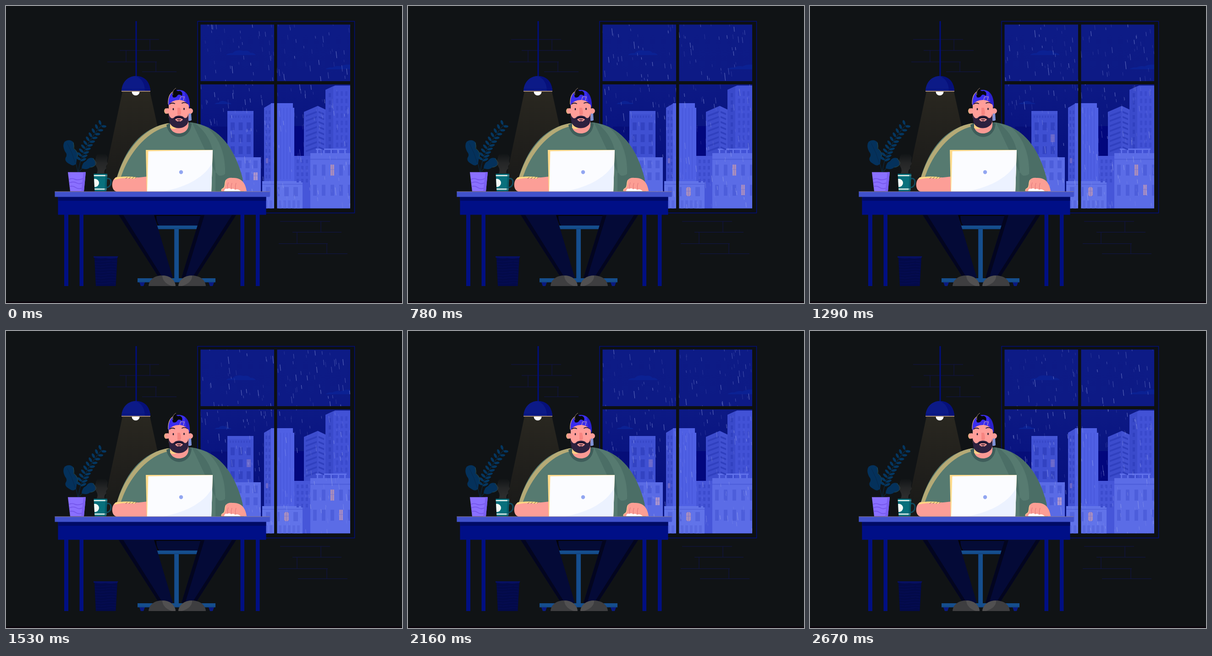
An HTML page that plays this animation: 864 by 648 pixels, repeating every 2700 ms.

```html
<!DOCTYPE html>
<html lang="en">
<head>
<meta charset="utf-8">
<title>Rainy night at the desk</title>
<style>
html, body { margin: 0; width: 100%; height: 100%; overflow: hidden; background: #101315; }
svg { display: block; width: 100vw; height: 100vh; }
</style>
</head>
<body>
<svg viewBox="0 0 864 648" xmlns="http://www.w3.org/2000/svg">
<defs>
  <clipPath id="panes"><path d="M424.5 40.5H585V164H424.5ZM591.5 40.5H751V164H591.5ZM424.5 171H585V441.5H424.5ZM591.5 171H751V441.5H591.5Z"/></clipPath>
  <clipPath id="shirtClip"><path id="shirt" d="M352 256C297 267 261 308 241 376V405H519L516 376C500 313 466 262 404 254Z"/></clipPath>
  <clipPath id="mugClip"><path d="M191.5 366H221L219 404H193.5Z"/></clipPath>
  <clipPath id="potClip"><path d="M135 362.500H174L170 404.500H140Z"/></clipPath>
  <linearGradient id="cone" x1="0" y1="0" x2="0" y2="1">
    <stop offset="0" stop-color="#292720"/><stop offset=".6" stop-color="#1f1e1b"/><stop offset="1" stop-color="#181918"/>
  </linearGradient>
  <linearGradient id="steam" x1="0" y1="0" x2="0" y2="1">
    <stop offset="0" stop-color="#333" stop-opacity="0"/><stop offset=".5" stop-color="#333" stop-opacity=".6"/><stop offset="1" stop-color="#333" stop-opacity=".85"/>
  </linearGradient>
  <linearGradient id="sky" x1="0" y1="0" x2="0" y2="1">
    <stop offset="0" stop-color="#0d1b86"/><stop offset=".3" stop-color="#0d1a85"/><stop offset=".7" stop-color="#07117e"/>
  </linearGradient>
</defs>

<rect width="864" height="648" fill="#101315"/>
<rect y="645" width="864" height="3" fill="#0b040c"/>
<g fill="none" stroke="#10154a">
  <path d="M225 73H334M314 73V97M248 97H357M262 97V122M221 122H329M327 122V143M297 143.500H372"/>
  <path d="M598 470H707M687 470V493M625 493.500H732M635 493V518M595 518.500H702M700 518V540M637 540.500H745"/>
</g>

<!-- window -->
<rect x="418" y="33.500" width="342.500" height="418" fill="#0d1012" stroke="#020e78" stroke-width="1.500"/>
<g clip-path="url(#panes)">
  <rect x="424" y="40" width="328" height="402" fill="url(#sky)"/>
  <g fill="#0b2193">
    <path d="M480 107q6-5 14-4q8-9 24-5q11-2 15 4q9 0 12 5Z"/>
    <path d="M697 138q7-5 15-4q10-5 18-2q8-5 22-4v10Z"/>
    <path d="M455 214q4-4 9-3q5-6 14-3q4 1 6 3q6 0 8 3Z"/>
  </g>
  <path d="M424 273H447V263H483V405H424Z" fill="#060e78"/>
  <rect x="629" y="262" width="22" height="70" fill="#02077d"/>
  <path d="M483 229H540V405H483Z" fill="#3f50d2"/>
  <path d="M483 229H540V236H483Z" fill="#4455d6"/>
  <path d="M500 330H556V405H500Z" fill="#5a6be5"/>
  <path d="M563 222L580 212V405H563Z" fill="#4252d3"/>
  <path d="M578 212H626V222H629V405H578Z" fill="#4f60e4"/>
  <path d="M650 231L680 218L697 226V335H650Z" fill="#3c4ccd"/>
  <path d="M680 218L697 226V335H680Z" fill="#4252d3"/>
  <path d="M697 183L718 173.500H751V330H697Z" fill="#4252d6"/>
  <path d="M697 183L714 175V330H697Z" fill="#3a4acb"/>
  <path d="M629 327H664V442H629Z" fill="#4656d9"/>
  <path d="M664 321H751V442H664Z" fill="#5b6ce6"/>
  <path d="M676 311H743V314H676ZM678 314H681V321H678ZM692 314H695V321H692ZM708 314H711V321H708ZM724 314H727V321H724ZM738 314H741V321H738Z" fill="#5f70ea"/>
  <path d="M664 333H751V336H664Z" fill="#5061dd"/>
  <path d="M559 382H647V442H559Z" fill="#6173e9"/>
  <path d="M559 388H647V390H559Z" fill="#5465df"/>
  <g id="dark"></g>
  <g id="lit"></g>
  <g id="rain" fill="none" stroke="#a5b0ee" stroke-linecap="round"></g>
</g>

<!-- lamp -->
<path d="M254 187H314L362 405H208Z" fill="url(#cone)"/>
<path d="M284 33V155" stroke="#010e7a" stroke-width="3"/>
<path d="M252 185C254 142 313 142 315 185Z" fill="#0c1a87"/>
<path d="M284 153C306 153 314 169 315 185H303C303 172 298 159 284 153Z" fill="#06107a"/>
<path d="M253 181H315" stroke="#071278"/>
<path d="M252 186H315" stroke="#cda98d" stroke-width="1.400"/>
<path d="M274.500 186.700H291.500C291 198 275 198 274.500 186.700Z" fill="#fff"/>

<!-- chair, trousers and shoes -->
<path d="M322 456H430L420 480H332Z" fill="#03030b"/>
<path d="M328 458H428V479H334Q328 471 328 458Z" fill="#040b36"/>
<g fill="#154e8d">
  <path d="M326 479H420V487H326ZM367 487H377V600H367ZM287 594H457V603H287Z"/>
</g>
<path d="M326 486H420M368 487V594M287 602H457" stroke="#103d79"/>
<g fill="#0a1a80"><path d="M291 603H303L300 611H294ZM442 603H454L451 611H445Z"/></g>
<path d="M246 456H323L364 593H334Z" fill="#040a37"/>
<path d="M246 456H256L342 593H334Z" fill="#03051f"/>
<path d="M425 456H502L414 593H383Z" fill="#040a37"/>
<path d="M425 456H433L391 593H383ZM493 456H502L414 593H406Z" fill="#03051f"/>
<g fill="#3e3e40">
  <path d="M311 611C312 596 325 588 341 588C358 588 369 598 370 611Z"/>
  <path d="M376 611C377 598 389 588 406 588C422 588 435 597 436 611Z"/>
</g>
<g fill="#515051">
  <path d="M341 588C358 588 369 598 370 611H362C352 608 341 600 341 588Z"/>
  <path d="M406 588C389 588 377 598 376 611H383C395 608 407 600 406 588Z"/>
</g>

<!-- bin -->
<path d="M193 549H243L239.500 611H196Z" fill="#030a49"/>
<path d="M191 546H244.500Q244 551 239 550Q227 552 217 550Q205 552 191 549Z" fill="#071060"/>
<g id="binLines" fill="none" stroke="#060d58"></g>

<!-- man -->
<use href="#shirt" fill="#567a70"/>
<g clip-path="url(#shirtClip)">
  <path d="M404 250C441 274 456 307 457 363Q472 374 478 366C480 320 462 282 435 262L525 250V405H457V363Z" fill="#4b6e66"/>
  <path d="M457 320C457 345 456 366 465 370Q474 371 478 365C477 343 473 317 463 300Z" fill="#577b71"/>
  <path d="M235 405C247 331 292 267 356 254L352 263C309 274 268 318 249 378V405Z" fill="#b5aa76"/>
</g>
<path d="M350 259C356 295 402 295 405 256L398 254L358 256Z" fill="#3e5d5a"/>
<path d="M358 243H398V259C398 284 358 284 358 261Z" fill="#fa9a94"/>
<path d="M358 253Q365 261 372 266Q366 271 358 266Z" fill="#ffcf84"/>
<path d="M397 234H404L405 249Q402 252 397 250Z" fill="#7e92d6"/>
<circle cx="352" cy="229" r="6" fill="#fb9d93"/>
<path d="M349 223.500C344 226 345 234 350 235" fill="none" stroke="#ffcf84" stroke-width="1.200"/>
<circle cx="402" cy="229" r="6" fill="#fb9d98"/>
<path d="M355 210Q377 196 399 211V240Q397 264 377 264Q356 262 355 238Z" fill="#ff9e99"/>
<path d="M355 236C359 247 364 246 367 243C371 238 384 238 388 243C391 246 396 245 398 235V250C396 271 359 273 356 250Z" fill="#2d213f"/>
<path d="M369 247Q377 242 386 247Q384 252 377 252Q371 252 369 247Z" fill="#fb9995"/>
<path d="M366 248Q369 240 377 242Q385 240 389 248Q383 244 377 245Q371 244 366 248Z" fill="#1c142c"/>
<path d="M373 248.500Q377 247 382 248.500M377.500 249V253" fill="none" stroke="#1c142c" stroke-width="1.300"/>
<path d="M374 222H380Q383 234 381 237Q377 240 374 237Z" fill="#f78581"/>
<path d="M357 214Q362 210 368 213M384 212Q391 209 396 213" fill="none" stroke="#21172d" stroke-width="1.800" stroke-linecap="round"/>
<ellipse cx="365" cy="225" rx="1.400" ry="2.500" fill="#21172d"/>
<ellipse cx="388.500" cy="224.500" rx="1.400" ry="2.500" fill="#21172d"/>
<path d="M354 217C352 195 363 183 377 183C393 183 401 197 401 223L398 215Q388 204 377 205Q362 205 354 217Z" fill="#3a2dee"/>
<path d="M390 187C399 194 402 207 401 223L398 215L393 209Z" fill="#2b20cd"/>
<path d="M354 214C353 198 359 188 368 185" fill="none" stroke="#e4b88c" stroke-width="1.100"/>
<path d="M379 205L381 198H389L387 206" fill="none" stroke="#c6a0b4" stroke-width="1.100"/>
<path d="M364 199C361 189 364 182 372 178C369 184 374 187 379 185Q387 188 384 196Q376 190 373 197Q369 201 364 199Z" fill="#07070d"/>
<path d="M364 194Q362 184 371 179" fill="none" stroke="#c5a98c" stroke-width=".8"/>

<!-- forearm, laptop, hand -->
<path d="M243 373Q275 377 309 372V405H243C227 404 229 375 243 373Z" fill="#fc9e97"/>
<path d="M239 374Q264 370 287 374L278 377Q258 373 236 379Z" fill="#ffd783"/>
<path d="M261 377l4-4M268 377l4-4M275 377l4-4M282 376l3-3" stroke="#593c49" stroke-width=".9"/>
<path d="M305 314H451L448 405H307Z" fill="#ffdb8b"/>
<path d="M310.500 317L451 314.500L448 405H308Z" fill="#fbfcff"/>
<path d="M450 342C435 371 399 394 342 405H448Z" fill="#ecf2ff"/>
<circle cx="382" cy="362.500" r="4.200" fill="#92a6f1"/>
<g id="hand">
  <path d="M470 404Q468 400 474 397C478 394 476 386 479 380Q484 374 494 375C511 374 522 383 525 404Z" fill="#fc9e94"/>
  <path d="M470 403Q470 399 475 397C479 393 477 386 480 380" fill="none" stroke="#ffcf8d" stroke-width="1.200"/>
  <path d="M476 404Q477 397 483 399Q488 396 491 400Q496 397 500 401Q506 398 512 404Z" fill="#fff"/>
  <path d="M485 385Q482 391 484 398M493 386Q490 393 492 399M502 386Q499 393 501 400" fill="none" stroke="#df7478"/>
</g>

<!-- plant -->
<g fill="none" stroke="#0a2942" stroke-width="1.300">
  <path d="M157 362Q152 336 141 318M158 362Q162 315 209 259M160 361Q167 352 182 345"/>
</g>
<path d="M128 296Q138 289 147 297Q149 305 147 311Q158 318 156 328Q154 335 153 344Q147 351 139 345Q127 339 130 331Q135 324 129 318Q122 304 128 296Z" fill="#04315b"/>
<path d="M147 298Q149 306 148 311Q158 318 156 329" fill="none" stroke="#315f5b" stroke-width=".8"/>
<path d="M134 300Q145 320 151 342" fill="none" stroke="#08284a"/>
<path d="M165 354Q166 342 175 338Q180 329 190 332L197 342Q195 351 184 352Q176 359 165 354Z" fill="#04315b"/>
<path d="M190 332L197 342Q195 351 184 352" fill="none" stroke="#31574f" stroke-width=".8"/>
<g id="fern" fill="#043660"></g>
<g clip-path="url(#potClip)">
  <rect x="134" y="362" width="41" height="43" fill="#8a70ff"/>
  <path d="M134 381q8-7 16-3t25-5M134 388q12-7 20-2t20-5M134 396q10-6 18 0t22-3" fill="none" stroke="#7658ec" stroke-width="2"/>
  <path d="M169 362H175V405H164Z" fill="#7c60f2"/>
</g>

<!-- mug -->
<path d="M198 365Q202 358 197 350Q191 341 196 332Q196 321 207 322Q219 319 222 331Q219 339 222 344Q217 350 219 354Q213 359 215 365Z" fill="url(#steam)"/>
<path d="M219 377C232 372 233 395 219 396" fill="none" stroke="#11495d" stroke-width="3"/>
<g clip-path="url(#mugClip)">
  <rect x="191" y="365" width="31" height="40" fill="#08707c"/>
  <path d="M191 370H222M191 399.500H222" stroke="#eef6f0" stroke-width="2.500"/>
  <circle cx="194" cy="386" r="9" fill="#f4faf6"/>
  <path d="M217 365H222V405H215Z" fill="#075766" opacity=".7"/>
</g>

<!-- desk -->
<g fill="#010f82"><path d="M127 455H136V611H127ZM160.500 455H169V611H160.500ZM511.500 455H520V611H511.500ZM545 455H553.500V611H545Z"/></g>
<rect x="113.500" y="416" width="454" height="39.500" fill="#000f87"/>
<rect x="113.500" y="416" width="454" height="9" fill="#000a66"/>
<rect x="106.500" y="405" width="469" height="11.500" fill="#4152cc"/>
<path d="M106.500 405H575.500" stroke="#8b7c91" stroke-width="1.200"/>
</svg>

<script>
const LOOP = 2700, STEP = 30;
const $ = id => document.getElementById(id);

function add(parent, tag, attrs) {
  const el = document.createElementNS("http://www.w3.org/2000/svg", tag);
  for (const k in attrs) el.setAttribute(k, attrs[k]);
  return parent.appendChild(el);
}

function grid(x, y, cols, rows, dx, dy, w, h, fill) {
  let d = "";
  for (let r = 0; r < rows; r++)
    for (let c = 0; c < cols; c++) d += `M${x + c * dx} ${y + r * dy}h${w}v${h}h${-w}Z`;
  add($("dark"), "path", { d, fill });
}

grid(490, 254, 3, 3, 17.5, 26, 9, 17, "#3343c2");
grid(488, 239, 8, 1, 6, 0, 3, 5, "#3848c8");
grid(505, 337, 3, 2, 17.5, 26, 9, 17, "#4c5dda");
grid(566, 228, 2, 11, 7, 14, 4, 8, "#3949c9");
grid(598, 222, 4, 1, 7, 0, 2, 156, "#4959dd");
grid(704, 190, 1, 8, 0, 16, 5, 9, "#3141c0");
grid(720, 186, 3, 8, 10, 16, 5, 10, "#3a4acd");
grid(634, 335, 3, 4, 10, 14, 5, 8, "#3c4cce");
grid(670, 346, 5, 2, 19, 44, 8, 24, "#4d5edb");
grid(567, 395, 4, 1, 20, 0, 10, 20, "#5364dd");
grid(565, 424, 8, 1, 10, 0, 6, 18, "#5869e1");
grid(567, 332, 1, 1, 0, 0, 5, 11, "#6965c9");
for (let y = 238; y < 320; y += 11)
  add($("dark"), "path", { d: `M654 ${y}L678 ${y - 9}V${y - 5}L654 ${y + 4}ZM682 ${y - 9}L694 ${y - 4}V${y}L682 ${y - 5}Z`, fill: "#3040bf" });

for (let y = 557; y < 608; y += 6)
  add($("binLines"), "path", { d: `M${193 + (y - 549) * .05} ${y}q12 2 24 0t${25 - (y - 549) * .1} 0` });

// fern leaflets along the stem
for (let i = 0; i < 10; i++) {
  const u = .26 + i * .08, v = 1 - u;
  const x = v * v * 158 + 2 * u * v * 162 + u * u * 209;
  const y = v * v * 362 + 2 * u * v * 315 + u * u * 259;
  for (const [side, turn] of [[-1, -145 + i * 4], [1, -24 + i * 3]])
    add($("fern"), "ellipse", { cx: 6.5, cy: 0, rx: 6.5 - i * .12, ry: 2.7,
      transform: `translate(${x} ${y + side}) rotate(${turn})` });
}

// x, y, width, height, colour, then on/off times
const lights = [
  [540, 363, 9, 17, "#aa94d0", [[0, 240], [1740, LOOP]]],
  [708, 346, 8, 24, "#aa8dbc", [[0, 1710]]],
  [607, 395, 10, 20, "#a78dc0", [[780, LOOP]]],
  [727, 390, 8, 23, "#a68cc4", [[780, 2160]]],
  [525, 280, 9, 17, "#6867cb", [[240, 780], [1260, LOOP]]]
].map(([x, y, w, h, fill, on]) => {
  const el = add($("lit"), "g", {});
  add(el, "rect", { x, y, width: w, height: h, rx: w === 10 ? 4 : 0, fill });
  add(el, "path", { d: `M${x + w / 2} ${y}v${h}M${x} ${y + h * .45}h${w}`, stroke: "#7772cb", "stroke-width": .8 });
  return { el, on };
});

let seed = 73;
const rand = () => (seed = seed * 16807 % 2147483647) / 2147483647;
const SPAN = 450, SLANT = .11;
const layers = [[.25, .7, 140], [.45, .8, 120], [.7, .8, 65]].map(([opacity, width, n], i) => ({
  el: add($("rain"), "path", { opacity, "stroke-width": width }),
  drops: Array.from({ length: n }, () => ({
    x: 375 + rand() * 376, y: rand() * SPAN, len: 4 + rand() * (7 + i * 3), laps: 3 + i
  }))
}));

const ease = u => { u = Math.max(0, Math.min(1, u)); return u * u * (3 - 2 * u); };

function draw(now) {
  const t = Math.floor(now % LOOP / STEP) * STEP;
  for (const { el, drops } of layers) {
    el.setAttribute("d", drops.map(p => {
      const y = (p.y + p.laps * SPAN * t / LOOP) % SPAN;
      return `M${(p.x + y * SLANT).toFixed(1)} ${(y + 22).toFixed(1)}l${(p.len * SLANT).toFixed(1)} ${p.len.toFixed(1)}`;
    }).join(""));
  }
  for (const { el, on } of lights)
    el.style.display = on.some(([a, b]) => t >= a && t < b) ? "" : "none";
  const shift = -5 * (ease((t - 180) / 210) - ease((t - 570) / 210));
  $("hand").setAttribute("transform", `translate(${shift.toFixed(2)} 0)`);
}

function tick() {
  draw(performance.now());
  requestAnimationFrame(tick);
}
tick();
</script>
</body>
</html>
```
